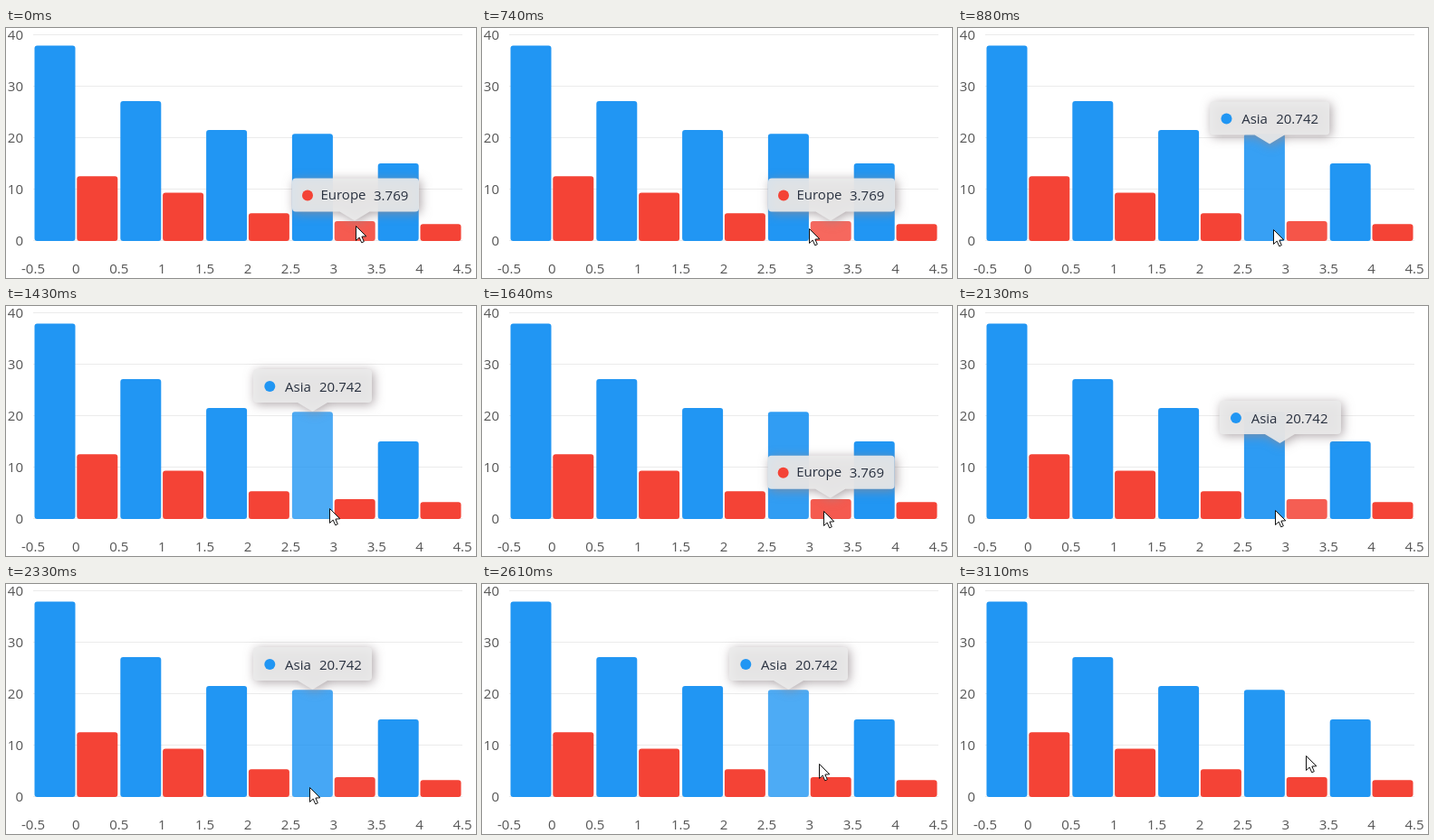
Recreate the animation shown at these times as an HTML page with a canvas. Size 519 by 277 pixels, loop 3410 ms.

```html
<!DOCTYPE html>
<html lang="en">
<head>
<meta charset="utf-8">
<title>Grouped column chart</title>
<style>
  html, body { margin: 0; width: 100%; height: 100%; overflow: hidden; background: #fff; }
  canvas { display: block; width: 519px; height: 277px; }
</style>
</head>
<body>
<canvas id="stage" width="519" height="277"></canvas>
<script>
const W = 519, H = 277, LOOP = 3410, STEP = 69, START = 670;
const FADE = 450, SLIDE = 220;
const FONT = '15px "Open Sans", "Noto Sans", sans-serif';
const BLUE = '#2196f3', RED = '#f44336';
const ctx = document.getElementById('stage').getContext('2d');

const plot = { left: 30, right: 504, base: 235.5, unit: 5.7, group: 94.8 };
const asia = [37.9, 27.1, 21.5, 20.742, 15];
const europe = [12.5, 9.3, 5.3, 3.769, 3.2];
const HOVERED = 3;

// Each pointer move eases out from wherever the last one ended
const rest = { x: 386, y: 219 };
const moves = [
  { from: 640, to: 877, x: 348, y: 223 },
  { from: 1360, to: 1850, x: 384, y: 228 },
  { from: 1950, to: 2326, x: 335, y: 225 },
  { from: 2465, to: 2740, x: 384, y: 190 }
];

// The tooltip stops just short of the blue column until "settle"
const hovers = [
  { color: RED, from: -185, to: 745 },
  { color: BLUE, from: 745, to: 1460, settle: 1200 },
  { color: RED, from: 1460, to: 2050 },
  { color: BLUE, from: 2050, to: 2735, settle: 2310 }
];

const mix = (a, b, k) => a + (b - a) * k;
const easeOut = (k, power) => 1 - (1 - Math.min(1, Math.max(0, k))) ** power;

function pointer(t) {
  return moves.reduce((p, m) => {
    const k = easeOut((t - m.from) / (m.to - m.from), 2);
    return { x: mix(p.x, m.x, k), y: mix(p.y, m.y, k) };
  }, rest);
}

function opacity(color, t) {
  const lit = hovers.filter(h => h.color === color).reduce((sum, h) =>
    sum + easeOut((t - h.from) / FADE, 2) - easeOut((t - h.to) / FADE, 2), 0);
  return 1 - 0.2 * lit;
}

// 0 = over the red column, 1 = over the blue one
function tipPosition(t) {
  return hovers.reduce((p, h) => {
    const goal = h.color === RED ? 0 : t < h.settle ? 0.94 : 1;
    return mix(p, goal, easeOut((t - h.from) / SLIDE, 3));
  }, 0);
}

function text(str, x, y, color, align = 'left') {
  ctx.font = FONT;
  ctx.fillStyle = color;
  ctx.textAlign = align;
  ctx.fillText(str, x, y);
}

function drawAxes() {
  for (let v = 0; v <= 40; v += 10) {
    const y = plot.base - v * plot.unit;
    ctx.fillStyle = '#ebebeb';
    ctx.fillRect(plot.left, y - 0.5, plot.right - plot.left, 1);
    text(v, 19, y + 5.5, '#555', 'right');
  }
  for (let i = 0; i <= 10; i++) {
    text(i / 2 - 0.5, plot.left + i * plot.group / 2, 272, '#555', 'center');
  }
}

function drawBars(values, offset, color, alpha) {
  ctx.fillStyle = color;
  values.forEach((v, i) => {
    const h = v * plot.unit;
    ctx.globalAlpha = i === HOVERED ? alpha : 1;
    ctx.beginPath();
    ctx.roundRect(plot.left + offset + i * plot.group, plot.base - h, 45, h + 0.5, 3);
    ctx.fill();
  });
  ctx.globalAlpha = 1;
}

function bubble(x, y, w, h, tipX) {
  const b = y + h, half = 16.5, r = 4;
  ctx.beginPath();
  ctx.moveTo(x + r, y);
  ctx.arcTo(x + w, y, x + w, b, r);
  ctx.arcTo(x + w, b, x, b, r);
  ctx.lineTo(tipX + half, b);
  ctx.lineTo(tipX, b + 10);
  ctx.lineTo(tipX - half, b);
  ctx.arcTo(x, b, x, y, r);
  ctx.arcTo(x, y, x + w, y, r);
  ctx.closePath();
}

function drawTooltip(k, color) {
  const onBlue = color === BLUE;
  const x = mix(316, 273, k), y = mix(166.5, 70, k);
  ctx.save();
  ctx.shadowColor = 'rgba(148,138,142,0.85)';
  ctx.shadowBlur = 12;
  ctx.shadowOffsetX = ctx.shadowOffsetY = 2;
  ctx.fillStyle = 'rgba(235,235,235,0.9)';
  bubble(x, y, mix(140, 131, k), 37, mix(385, 338.5, k));
  ctx.fill();
  ctx.restore();

  ctx.fillStyle = color;
  ctx.beginPath();
  ctx.arc(x + (onBlue ? 18.3 : 17), y + 19, 6, 0, Math.PI * 2);
  ctx.fill();
  const ink = '#28303f';
  if (onBlue) {
    text('Asia', x + 35, y + 24.5, ink);
    text('20.742', x + 73, y + 24.5, ink);
  } else {
    text('Europe', x + 31.5, y + 23, ink);
    text('3.769', x + 90, y + 24.5, ink);
  }
}

function drawCursor({ x, y }) {
  ctx.save();
  ctx.translate(Math.round(x) + 0.5, Math.round(y) + 0.5);
  ctx.beginPath();
  [[0, 0], [0, 16], [3.7, 12.6], [6.2, 18.3], [8.8, 17.2], [6.4, 11.6], [11.3, 11.3]]
    .forEach(p => ctx.lineTo(...p));
  ctx.closePath();
  ctx.fillStyle = '#fff';
  ctx.fill();
  ctx.strokeStyle = '#111';
  ctx.lineWidth = 1;
  ctx.stroke();
  ctx.restore();
}

function draw(now) {
  const time = now % LOOP;
  const t = Math.max(0, START + Math.floor((time - START) / STEP) * STEP);
  ctx.fillStyle = '#fff';
  ctx.fillRect(0, 0, W, H);
  drawAxes();
  drawBars(asia, 1.5, BLUE, opacity(BLUE, t));
  drawBars(europe, 48.3, RED, opacity(RED, t));
  const hover = hovers.find(h => t >= h.from && t < h.to);
  if (hover) drawTooltip(tipPosition(t), hover.color);
  drawCursor(pointer(t));
}

const begin = performance.now();
function loop() {
  draw(performance.now() - begin);
  requestAnimationFrame(loop);
}
loop();
</script>
</body>
</html>
```
